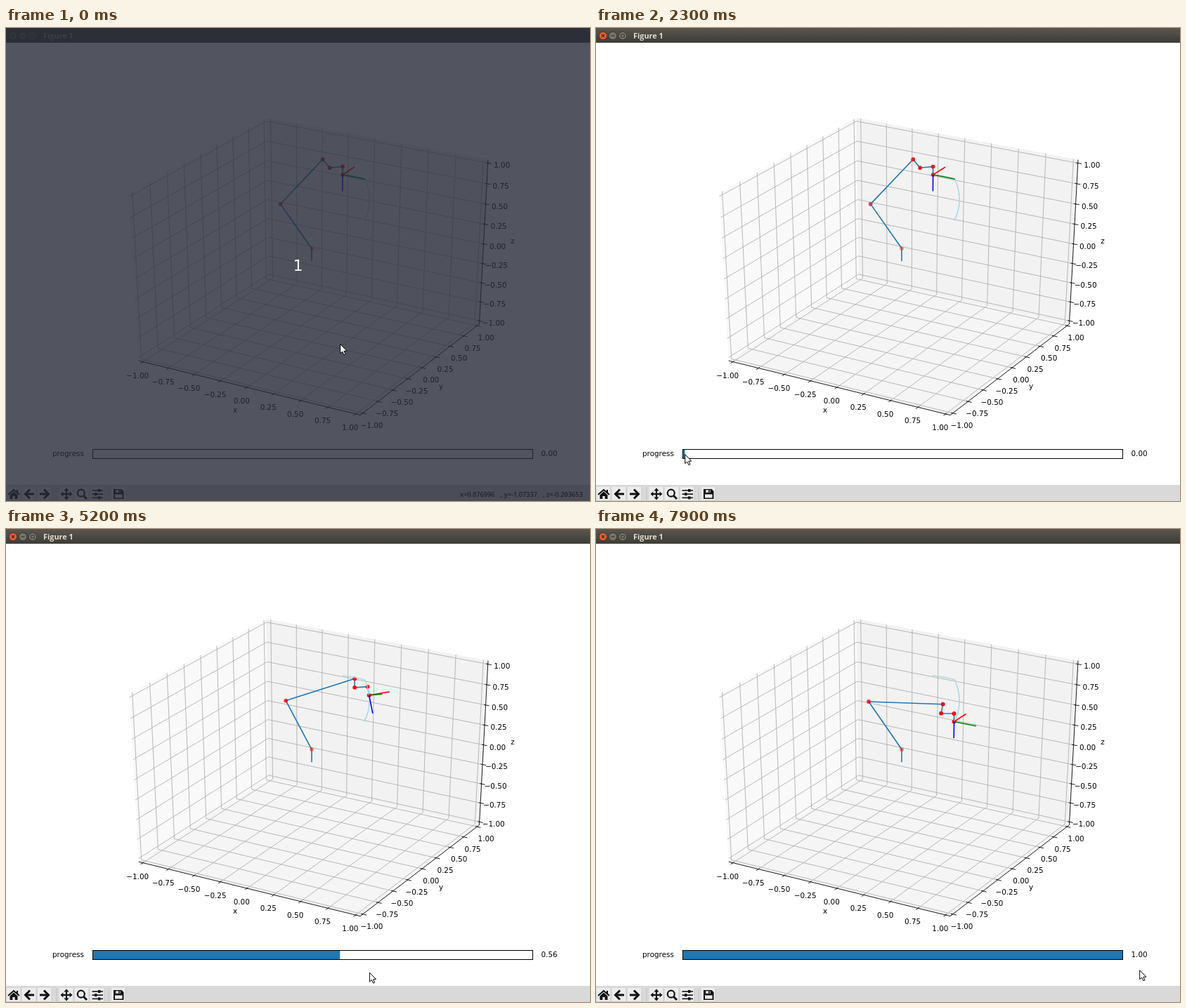
Write an HTML page with a canvas that moves like this. It is 831x674 px and loops after 8000 ms.

```html
<!DOCTYPE html>
<html lang="en">
<head>
<meta charset="utf-8">
<title>Figure 1</title>
<style>
  html, body { margin: 0; width: 100%; height: 100%; overflow: hidden; background: #fff; }
  canvas { display: block; }
</style>
</head>
<body>
<canvas id="stage" width="831" height="674"></canvas>
<script>
const ctx = document.getElementById('stage').getContext('2d');
const LOOP = 8000, TICK = 100;
const FOCUS = 2100, DRAG = 3700, RELEASE = 7200;
const CORNER = 0.28; // progress at which the path turns downwards
const PLOT_FONT = '10.4px "DejaVu Sans", sans-serif';
const EDGE = 1 + 1 / 24;

// The two halves of the tip's path, as Bezier control points.
const ACROSS = [[479, 209], [499, 211], [510.5, 215]];
const DOWN = [[510.5, 215], [518, 232], [521, 254], [509.5, 274.5]];

const APPROACH = [[200, 476, 450], [1000, 132, 611], [1300, 96, 621], [1700, 123, 607], [FOCUS, 127, 607]];
const DRAGGED = [[DRAG, 0.208], [4500, 0.34], [5200, 0.562], [6100, 0.808], [RELEASE, 1]];

const lerp = (a, b, f) => a + (b - a) * f;
const mix = (p, q, f) => p.map((v, i) => lerp(v, q[i], f));
const add = (p, x, y) => [p[0] + x, p[1] + y];

function track(keys, t) {
  const next = keys.findIndex(k => k[0] > t);
  if (next === 0) return keys[0].slice(1);
  if (next < 0) return keys[keys.length - 1].slice(1);
  const a = keys[next - 1], b = keys[next];
  return mix(a, b, (t - a[0]) / (b[0] - a[0])).slice(1);
}

function bezier(points, f) {
  while (points.length > 1) points = points.slice(1).map((p, i) => mix(points[i], p, f));
  return points[0];
}

// Perspective camera at azimuth -60, elevation 30, distance 10.
function project(x, y, z) {
  const right = 0.433 * x + 0.25 * y;
  const up = -0.125 * x + 0.2165 * y + 0.433 * z;
  const depth = 10 - (0.2165 * x - 0.375 * y + 0.25 * z);
  return [435 + 3494 * right / depth, 332.3 - 2622 * up / depth];
}

function trace(points) {
  ctx.beginPath();
  points.forEach(([x, y], i) => i ? ctx.lineTo(x, y) : ctx.moveTo(x, y));
}

function line(points, color, width) {
  trace(points);
  ctx.strokeStyle = color;
  ctx.lineWidth = width;
  ctx.stroke();
}

function shape(points, color) {
  trace(points);
  ctx.fillStyle = color;
  ctx.fill();
}

function disc(x, y, r, color) {
  ctx.beginPath();
  ctx.arc(x, y, r, 0, 7);
  ctx.fillStyle = color;
  ctx.fill();
}

function box(x, y, w, h, color) {
  ctx.fillStyle = color;
  ctx.fillRect(x, y, w, h);
}

function frameBox(x, y, w, h, color) {
  ctx.strokeStyle = color;
  ctx.lineWidth = 1;
  ctx.strokeRect(x, y, w, h);
}

function text(str, x, y, font = PLOT_FONT, color = '#000', align = 'left') {
  ctx.font = font;
  ctx.fillStyle = color;
  ctx.textAlign = align;
  ctx.fillText(str, x, y);
}

const centered = (str, x, y) => text(str, x, y, PLOT_FONT, '#000', 'center');

function drawTitleBar(focused) {
  const shade = ctx.createLinearGradient(0, 0, 0, 21);
  shade.addColorStop(0, focused ? '#59574f' : '#42413c');
  shade.addColorStop(1, focused ? '#3d3c37' : '#3b3a36');
  box(0, 0, 831, 21, shade);
  const ink = '#35342f';
  for (let i = 0; i < 3; i++) {
    const x = 10 + 14 * i;
    disc(x, 11, 6, '#33322e');
    disc(x, 11, 5.3, !focused ? '#5d5b53' : i ? '#77756b' : '#ec5b2c');
  }
  line([[8, 9], [12, 13]], ink, 1.2);
  line([[12, 9], [8, 13]], ink, 1.2);
  line([[21.5, 11], [26.5, 11]], ink, 1.2);
  frameBox(35.7, 9, 4.6, 4, ink);
  text('Figure 1', 53, 15, 'bold 10.9px "Open Sans", sans-serif', focused ? '#dfdbd2' : '#8f8b80');
}

function drawTick(v, at, inner, outer, dx, dy) {
  line([inner, outer], '#000', 0.9);
  centered(v.toFixed(2).replace('-', '\u2212'), at[0] + dx, at[1] + dy + 3.8);
}

function drawAxes() {
  const E = EDGE, P = project;
  const inner = E - 1 / 60, outer = E + 1 / 30;
  const left = P(-E, -E, -E), front = P(E, -E, -E), right = P(E, E, -E), back = P(-E, E, -E);
  const leftTop = P(-E, -E, E), rightTop = P(E, E, E), backTop = P(-E, E, E);

  shape([leftTop, backTop, back, left], '#f9f9f9');
  shape([backTop, rightTop, right, back], '#f2f2f2');
  shape([left, back, right, front], '#f5f5f5');

  for (let v = -1; v <= 1; v += 0.25) {
    line([P(v, -E, -E), P(v, E, -E), P(v, E, E)], '#b0b0b0', 0.9);
    line([P(-E, v, E), P(-E, v, -E), P(E, v, -E)], '#b0b0b0', 0.9);
    line([P(-E, -E, v), P(-E, E, v), P(E, E, v)], '#b0b0b0', 0.9);
  }
  line([left, front], '#000', 0.9);
  line([front, right, rightTop], '#000', 0.9);
  for (let v = -1; v <= 1; v += 0.25) {
    drawTick(v, P(v, -E, -E), P(v, -inner, -E), P(v, -outer, -E), -7.6, 19.2);
    drawTick(v, P(E, v, -E), P(inner, v, -E), P(outer, v, -E), 12.8, 17);
    drawTick(v, P(E, E, v), P(inner, E, v), P(outer, E, v), 20, 3);
  }
  centered('x', 326, 548);
  centered('y', 619, 514);
  centered('z', 721, 307);
}

function drawRobot(p) {
  // The hand turns away until the corner, then turns back.
  const swing = p < CORNER ? p / CORNER : (1 - p) / (1 - CORNER);
  const tip = p < CORNER ? bezier(ACROSS, p / CORNER) : bezier(DOWN, 1 - swing);
  const wrist = add(tip, -3.5 * swing, -11.5 - swing);
  const forearm = add(wrist, -18.4, 1.7 - 2 * p * p);
  const shoulder = add(forearm, 2.5 - 12.5 * (1 - p) ** 2, -12 - p);
  const elbow = [lerp(390.5, 388, p) + 15 * swing, lerp(251, 246, p) - 6 * swing];
  const base = project(0, 0, 0.16);
  const joints = [base, elbow, shoulder, forearm, wrist, tip];

  ctx.lineJoin = 'round';
  line([project(0, 0, 0), ...joints], '#1f77b4', 1.6);
  const red = lerp(218, 255, Math.min(1, p * 5));
  joints.forEach(([x, y], i) => {
    disc(x, y, 2.9, `rgba(${red},${255 - red},${255 - red},${Math.min(1, 0.5 + 0.3 * i)})`);
  });

  trace([ACROSS[0]]);
  ctx.quadraticCurveTo(...ACROSS.slice(1).flat());
  ctx.bezierCurveTo(...DOWN.slice(1).flat());
  ctx.strokeStyle = '#add8e6';
  ctx.lineWidth = 1.6;
  ctx.stroke();

  line([tip, add(tip, 17 + 20 * swing, -11 + 10 * swing)], '#f00', 1.6);
  line([tip, add(tip, 31.5 - 21 * swing, 6.3 - 13 * swing)], '#008000', 1.6);
  line([tip, add(tip, 9 * swing - 0.3, 23.5 + 4 * swing)], '#00f', 1.6);
  ctx.lineJoin = 'miter';
}

function drawSlider(progress) {
  text('progress', 66, 609.5);
  box(124, 601, 625 * progress, 12, '#1f77b4');
  frameBox(123.5, 600.5, 626, 13, '#000');
  text(progress.toFixed(2), 761.5, 609.5);
}

function button(x) {
  box(x, 654, 20.5, 20, '#c9c9c9');
  box(x, 654, 19.5, 19, '#ececec');
}

function drawArrow(x, dir, ink) {
  line([[x + 7 * dir, 664], [x - 5 * dir, 664]], ink, 3);
  line([[x + dir, 657.5], [x - 5.5 * dir, 664], [x + dir, 670.5]], ink, 3);
}

function drawToolbar() {
  const ink = '#111';
  box(0, 651, 831, 23, '#d9d9d9');
  for (let i = 0; i < 3; i++) {
    button(1 + 22 * i);
    button(76 + 22 * i);
  }
  button(150);
  box(71.5, 654, 1, 20, '#c4c4c4');
  box(145.5, 654, 1, 20, '#c4c4c4');

  // home
  line([[3, 665], [11, 658], [19, 665]], ink, 2);
  shape([[5.5, 665.5], [11, 660.5], [16.5, 665.5], [16.5, 671], [5.5, 671]], ink);
  box(9.3, 667, 3.4, 4, '#ececec');
  box(15, 658, 2, 4, ink);

  drawArrow(33, 1, ink);
  drawArrow(55, -1, ink);

  // pan
  for (let i = 0; i < 4; i++) {
    ctx.save();
    ctx.translate(86, 664);
    ctx.rotate(i * Math.PI / 2);
    line([[0, 0], [0, -7]], ink, 2.2);
    shape([[0, -8.5], [3.6, -4.6], [-3.6, -4.6]], ink);
    ctx.restore();
  }

  // zoom
  disc(106.8, 662.7, 6.1, ink);
  disc(106.8, 662.7, 3.9, '#ececec');
  line([[110.5, 666.5], [115, 671]], ink, 3);

  // sliders
  for (let i = 0; i < 3; i++) {
    const y = 659 + 5.2 * i;
    line([[122.5, y], [138, y]], ink, 1.6);
    box(i === 1 ? 126 : 131, y - 2, 3.5, 4, ink);
  }

  // save
  shape([[153, 657], [164.5, 657], [167.5, 660], [167.5, 671], [153, 671]], ink);
  box(155, 664.5, 10.5, 5, '#ececec');
  box(156.2, 658.3, 6.5, 3.5, '#ececec');
  box(160, 658.3, 1.8, 3.2, ink);
}

function drawReadout(x, y) {
  if (y > 580) return;
  const font = '600 9.2px "Open Sans", sans-serif';
  const dx = x - 476, dy = y - 450;
  text('x=' + (0.876996 + dx / 190).toPrecision(6), 646, 667.5, font);
  text(', y=' + (-1.07337 - dx / 9000).toPrecision(6), 704, 667.5, font);
  text(', z=' + (-0.203653 - dy / 160).toPrecision(6), 764, 667.5, font);
}

function drawPointer(x, y) {
  ctx.save();
  ctx.translate(x - 0.3, y + 0.7);
  trace([[0, 0], [0, 13], [3, 10.3], [5.2, 15], [7.3, 14], [5.2, 9.6], [9.2, 9.4]]);
  ctx.closePath();
  ctx.fillStyle = '#fff';
  ctx.fill();
  ctx.strokeStyle = '#000';
  ctx.lineWidth = 1;
  ctx.stroke();
  ctx.restore();
}

function progressAt(t) {
  if (t < DRAG) return t < FOCUS ? 0 : 0.004;
  return track(DRAGGED, t)[0];
}

// While dragging, the pointer runs a little ahead of the bar and sinks below it.
function pointerAt(t, p) {
  if (t < DRAG) return track(APPROACH, t);
  const drift = Math.max(0, (t - RELEASE) / 700);
  return [
    137 + 625 * p + 30 * Math.sin(Math.PI * p) + 12 * drift,
    600 + 36.5 * Math.sin(1.85 * p) - 7 * drift
  ];
}

function draw(time) {
  const t = Math.floor(time / TICK) * TICK;
  const progress = progressAt(t);
  const [x, y] = pointerAt(t, progress);

  box(0, 0, 831, 674, '#fff');
  drawTitleBar(t >= FOCUS);
  drawAxes();
  drawRobot(progress);
  drawSlider(progress);
  drawToolbar();
  drawReadout(x, y);
  if (t < 200) {
    box(0, 0, 831, 674, 'rgba(39,43,55,0.8)');
    text('1', 415.5, 346, '22px "DejaVu Sans", sans-serif', '#fff', 'center');
  }
  drawPointer(x, y);
}

function frame() {
  draw(performance.now() % LOOP);
  requestAnimationFrame(frame);
}
frame();
</script>
</body>
</html>
```
